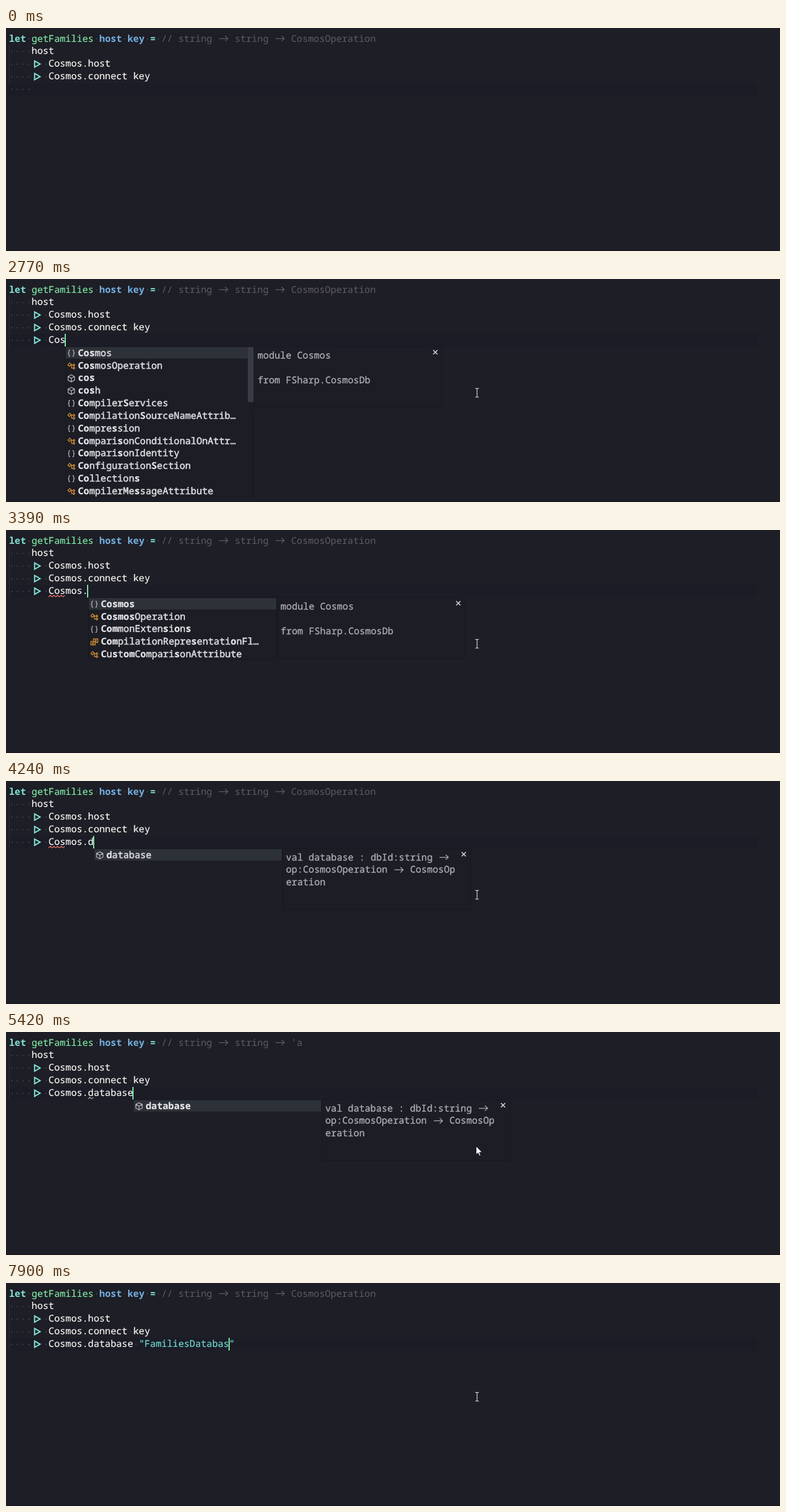
An HTML page that plays this animation: 1280 px wide and 370 px high, repeating every 8 s.

```html
<!DOCTYPE html>
<html lang="en">
<head>
<meta charset="utf-8">
<title>Typing a pipeline</title>
<style>
  html, body { margin: 0; width: 100%; height: 100%; overflow: hidden; background: #1e1e26; }
  svg { display: block; width: 1280px; height: 370px; }
  text {
    font: 15.5556px "Noto Sans Mono", "DejaVu Sans Mono", monospace;
    white-space: pre; text-rendering: geometricPrecision;
    fill: #f8f8f4; stroke: #f8f8f4; stroke-width: .2px;
  }
  path { fill: none; }
  .op { fill: #80e3d6; stroke: none; font-weight: 700; }
  .fn { fill: #7fe8a6; stroke: #7fe8a6; }
  .arg { fill: #74b0e0; stroke: none; font-weight: 700; }
  .rem { fill: #5d5d60; stroke: none; }
  .str { fill: #70d8cf; stroke: #70d8cf; }
  .item { fill: #dadadd; stroke: #dadadd; stroke-width: .6px; }
  .item tspan { fill: #e6e6e8; stroke: #e6e6e8; stroke-width: .2px; font-weight: 700; }
  .doc { fill: #acacb0; stroke: #acacb0; stroke-width: .35px; }
  .dot { fill: #3b3c48; }
  .panel { fill: #1c1d25; stroke: #181920; }
</style>
</head>
<body>
<svg id="stage" viewBox="0 0 1280 370"></svg>
<script>
const LOOP = 8000, CW = 28 / 3, ROW = 20.83, LEFT = 5;
const stage = document.getElementById('stage');
const colX = c => LEFT + c * CW;
const baseY = row => 22.6 + row * ROW;

// One time per character typed on the last line
const TYPED = '|> Cosmos.database "FamiliesDatabas';
const KEYS = [
  1860, 2060, 2260, 2470, 2680, 2770, 3000, 3090, 3190, 3390,
  4210, 4350, 4490, 4770, 5020, 5090, 5230, 5370, 5510, 5650,
  5850, 6030, 6130, 6280, 6520, 6650, 6780, 6900, 7030,
  7190, 7330, 7470, 7610, 7760, 7900
];
const MOUSE = [[670, 1087, 339], [790, 968, 277], [910, 838, 212], [1040, 779, 189]];
const CHANGES = [...KEYS, ...MOUSE.map(m => m[0]), 1160, 1680, 3290, 3930, 4070, 4630]
  .sort((a, b) => a - b);

// Completion entries: icon, label, letters that match
const SHORT = [
  ['ns', 'Cosmos'], ['cls', 'CosmosOperation'], ['fun', 'cos'], ['fun', 'cosh'],
  ['ns', 'CompilerServices'], ['cls', 'CompilationSourceNameAttrib…'],
  ['ns', 'Compression'], ['cls', 'ComparisonConditionalOnAttr…'],
  ['ns', 'ComparisonIdentity'], ['cls', 'ConfigurationSection'],
  ['ns', 'Collections'], ['cls', 'CompilerMessageAttribute']
].map(e => [...e, 'cos']);
const LONG = [
  ['ns', 'Cosmos', 'cosmos'], ['cls', 'CosmosOperation', 'cosmos'],
  ['ns', 'CommonExtensions', 'comsos'],
  ['enum', 'CompilationRepresentationFl…', 'comsos'],
  ['cls', 'CustomComparisonAttribute', 'csomos']
];
const MEMBERS = ['connect', 'container', 'database', 'execAsync',
  'fromConnectionString', 'host', 'parameters', 'query'].map(m => ['fun', m, m]);
const MODULE_DOC = ['module Cosmos', '', 'from FSharp.CosmosDb'];
const CONNECT_DOC = ['val connect : key:string -> op', ':CosmosOperation -> CosmosOper', 'ation'];
const DATABASE_DOC = ['val database : dbId:string -> ', 'op:CosmosOperation -> CosmosOp', 'eration'];

const ICONS = {
  ns: ['#bdbdc2', 'M4.6 1H3.8Q2.6 1 2.6 2.4V4.4Q2.6 6 1 6Q2.6 6 2.6 7.6V9.6Q2.6 11 3.8 11H4.6' +
    'M8.4 1H9.2Q10.4 1 10.4 2.4V4.4Q10.4 6 12 6Q10.4 6 10.4 7.6V9.6Q10.4 11 9.2 11H8.4'],
  cls: ['#dc9434', 'M.8 4.4L4 1.2L6.4 3.6L3.2 6.8ZM5.4 4.8H9M6.8 4.8V9.6H9' +
    'M9 4.8L10.7 3.1L12.4 4.8L10.7 6.5ZM9 9.6L10.7 7.9L12.4 9.6L10.7 11.3Z'],
  fun: ['#bdbdc2', 'M6.5 .2L11.8 3V9L6.5 12L1.2 9V3ZM1.2 3L6.5 5.8L11.8 3M6.5 5.8V12'],
  enum: ['#dc9434', 'M5 5V1H12.4V7H8.4M7 3H10.6M7 5H10.6M.8 5.4H8V11H.8ZM2.6 7.4H6.2M2.6 9.2H6.2']
};

const rect = (x, y, w, h, attr) =>
  `<rect x="${x}" y="${y}" width="${w}" height="${h}" ${attr}/>`;
const path = (d, color, width, extra = '') =>
  `<path d="${d}" stroke="${color}" stroke-width="${width}" ${extra}/>`;
const label = (x, y, str, cls) => `<text x="${x}" y="${y}" class="${cls}">${str}</text>`;

function arrow(x, y, color) {
  return path(`M${x + 2} ${y}H${x + 16.5}M${x + 12} ${y - 4.3}L${x + 16.5} ${y}L${x + 12} ${y + 4.3}`, color, 1.3);
}

// Text with two-cell arrows
function prose(x, y, str, cls, color) {
  let out = label(x, y, str.replaceAll('->', '  '), cls);
  for (const m of str.matchAll(/->/g)) out += arrow(x + m.index * CW, y - 5, color);
  return out;
}

function codeLine(row, parts) {
  let col = 0, out = '';
  const y = baseY(row);
  for (const [str, cls] of parts) {
    const x = colX(col);
    if (cls === 'rem') out += prose(x, y, str, cls, '#5d5d60');
    else if (str === '|>')
      out += path(`M${x + 5} ${y - 9.6}L${x + 14} ${y - 4.4}L${x + 5} ${y + .8}Z`, '#80e3d6', 2);
    else {
      out += label(x, y, str, cls);
      [...str].forEach((ch, i) => {
        if (ch === ' ')
          out += rect(Math.round(x + (i + .5) * CW - 1), Math.round(y - 5.2), 2, 2, 'class="dot"');
      });
    }
    col += str.length;
  }
  return out;
}

function squiggle(col, cells, color) {
  const x = colX(col);
  let d = `M${x} 111`;
  for (let i = 3; i <= cells * CW + 1; i += 3) d += `L${x + i} ${i % 2 ? 108.4 : 111}`;
  return path(d, color, 1.2);
}

function emphasise(str, letters) {
  let k = 0;
  return [...str].map(ch =>
    k < letters.length && ch.toLowerCase() === letters[k].toLowerCase()
      ? (k++, `<tspan>${ch}</tspan>`) : ch).join('');
}

function listBox(x, items, typed) {
  const full = items.length > 11, h = items.length * ROW;
  let out = rect(x + .5, 112.5, 311, h - 1.5, 'class="panel"');
  out += rect(x + 1, 113, full ? 301 : 310, 19, 'fill="#2d3138"');
  if (full) out += rect(x + 302, 113, 9.5, 91, 'fill="#383a44"');
  items.forEach(([icon, name, match], i) => {
    const y = baseY(i + 5) + 1, [color, d] = ICONS[icon];
    out += path(d, color, 1.2, `transform="translate(${x + 3.5} ${y - 10.6})"`);
    out += label(x + 21, y, emphasise(name, match.slice(0, typed)), 'item');
  });
  return out;
}

function docBox(x, lines) {
  const cx = x + 612;
  let out = rect(x + 312.5, 112.5, 311, 101, 'class="panel"');
  lines.forEach((s, i) => out += prose(x + 318, baseY(5 + i) + 4.8, s, 'doc', '#acacb0'));
  return out + path(`M${cx - 3.5} 118L${cx + 3.5} 125M${cx + 3.5} 118L${cx - 3.5} 125`, '#dcdce0', 1.5);
}

function popup(t, n) {
  if (t < 2680 || t >= 5510) return '';
  const x = Math.round(colX(4 + n));
  let items = SHORT, typed = n - 3, doc = MODULE_DOC;
  if (t >= 3930) {
    typed = n - 10;
    const prefix = TYPED.slice(10, n);
    items = MEMBERS.filter(m => m[1].startsWith(prefix));
    doc = typed ? DATABASE_DOC : CONNECT_DOC;
  } else if (n > 6) {
    items = LONG;
    typed = Math.min(typed, 6);
  }
  const hasDoc = t >= 2770 && !(t >= 3930 && t < 4070);
  return listBox(x, items, typed) + (hasDoc ? docBox(x, doc) : '');
}

function mouse(t, n) {
  const at = MOUSE.filter(m => m[0] <= t).pop();
  if (!at) return '';
  const [, x, y] = at;
  if (n >= 13 && t < 5510)
    return `<path d="M${x - 1.5} ${y + .5}v14l3.2-3l2.2 5l2.2-1l-2.2-4.8h4.4z" style="fill:#fff" stroke="#111" stroke-width=".8"/>`;
  return path(`M${x - 3} ${y - 7.5}H${x - 1}L${x} ${y - 6.5}L${x + 1} ${y - 7.5}H${x + 3}` +
    `M${x} ${y - 6.5}V${y + 6}M${x - 3} ${y + 7}H${x - 1}L${x} ${y + 6}L${x + 1} ${y + 7}H${x + 3}`, '#dedee2', 1.1);
}

function draw(t) {
  const n = KEYS.filter(k => k <= t).length;
  const result = t >= 4630 && t < 6650 ? "'a" : 'CosmosOperation';
  const pad = ['    ', ''], pipe = ['|>', 'op'];
  const text = TYPED.slice(0, n);
  const last = [pad];
  if (n === 1) last.push(['|', 'op']);
  if (n > 1) last.push(pipe, [text.slice(2, 19), '']);
  if (n > 19) last.push([text.slice(19) + '"', 'str']);

  let out = rect(4, 91, 1239, 21, 'fill="#1b1c26"');
  out += rect(0, 369, 1280, 1, 'fill="#1a1420"');
  out += rect(5, 28, 1, n ? 84 : 63, 'fill="#2d2e38"');
  out += codeLine(0, [['let', 'op'], [' ', ''], ['getFamilies', 'fn'], [' ', ''], ['host', 'arg'],
    [' ', ''], ['key', 'arg'], [' ', ''], ['=', 'op'], [' ', ''],
    ['// string -> string -> ' + result, 'rem']]);
  out += codeLine(1, [pad, ['host', '']]);
  out += codeLine(2, [pad, pipe, [' Cosmos.host', '']]);
  out += codeLine(3, [pad, pipe, [' Cosmos.connect key', '']]);
  out += codeLine(4, last);
  if (t >= 3290 && t < 5020) out += squiggle(7, 3, '#ea7468');
  if (t >= 5020 && t < 6650) out += squiggle(14, 1, '#a39a9e');
  if (t >= 670 && (t < 1160 || t >= 1680))
    out += rect(Math.round(colX(4 + n) - 1.4), 91, 2, 21, 'fill="#7be5a2"');
  stage.innerHTML = out + popup(t, n) + mouse(t, n);
}

let shown = -1;
function tick(now) {
  const t = now % LOOP;
  const step = CHANGES.filter(c => c <= t).length;
  if (step !== shown) {
    shown = step;
    draw(t);
  }
  requestAnimationFrame(tick);
}
draw(0);
requestAnimationFrame(tick);
</script>
</body>
</html>
```
